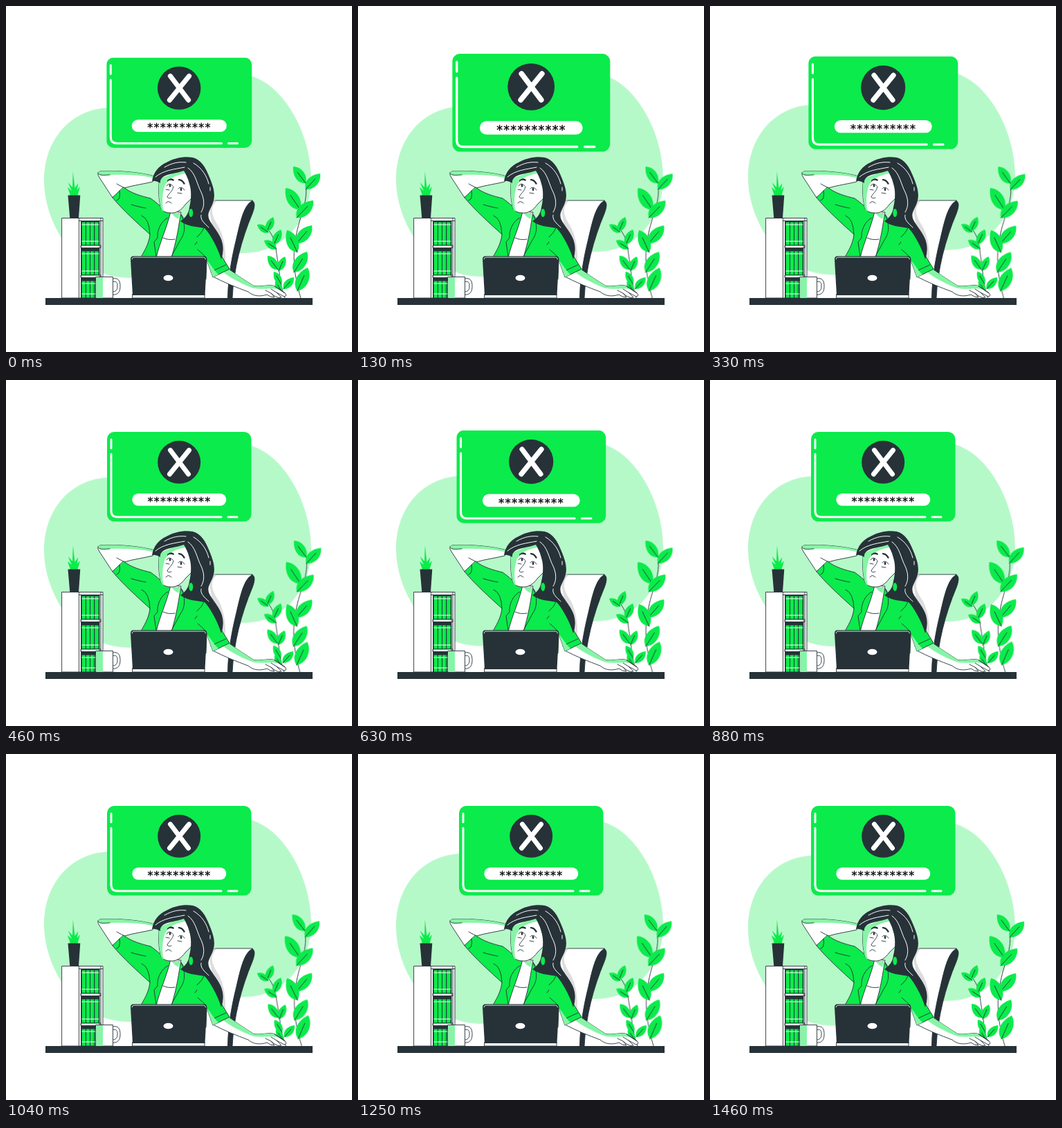
An HTML page for the animation above (1500 ms loop, 500x500 px).

```html
<!DOCTYPE html>
<html lang="en">
<head>
<meta charset="utf-8">
<title>Wrong password</title>
<style>
  html, body { margin: 0; width: 100%; height: 100%; overflow: hidden; background: #fff; }
  svg { display: block; width: 100%; height: 100%; }
  .g { fill: #0beb4b; }
  .d { fill: #263238; }
  .w { fill: #fff; }
  .m { fill: #85f5a5; }
  .ln { fill: none; }
  .o { stroke: #263238; stroke-width: .9; stroke-linecap: round; stroke-linejoin: round; }
  .hl { fill: none; stroke: #fff; stroke-linecap: round; stroke-linejoin: round; }
  #blob, #card, #plants { animation: 1.5s linear -10ms infinite; }
  #blob { animation-name: float; }
  #card { animation-name: beat; transform-origin: 250.2px 139.6px; }
  #plants { animation-name: wind; transform-origin: 408px 327px; }
  @keyframes float { 50% { transform: translateY(-10px); } }
  @keyframes beat {
    0%, 30%, 39.2%, 59.2%, 100% { transform: scale(1); }
    10%, 49.2% { transform: scale(1.1); }
  }
  @keyframes wind {
    0%, 100% { transform: rotate(0deg); }
    25% { transform: rotate(1deg); }
    75% { transform: rotate(-1deg); }
  }
</style>
</head>
<body>
<svg viewBox="0 0 500 500">
  <path id="blob" fill="#b6f9c9" d="M55 253C55 192 95 148 150 147C225 146 262 97 335 98C395 99 441 180 441 250C441 312 398 357 345 357C290 357 240 393 178 393C100 393 55 312 55 253Z"/>

  <g id="card">
    <rect class="g" x="146" y="75" width="208.5" height="129.5" rx="10.5"/>
    <path class="hl" stroke-width="3" d="M152 86V98.500M152 107V189Q152 198 161 198H311M321 198H334"/>
    <circle class="d" cx="250.200" cy="118.800" r="31"/>
    <path class="hl" stroke-width="7" d="M237.500 101.500L263.500 136M264.500 101.500L236.500 136"/>
    <rect class="w" x="182.300" y="164" width="136" height="17.800" rx="8.900"/>
    <text x="204.500" y="181.200" font-family="DejaVu Sans, sans-serif" font-size="16" letter-spacing="1.2" stroke="#111" stroke-width=".35">**********</text>
  </g>

  <g id="chair">
    <path class="w o" d="M290 284Q296 281 304 281H356C348 290 340 308 333 340Q326 372 322 400L300 380Z"/>
    <path fill="#dedcdc" d="M292 284Q300 280 304 282C292 295 300 307 308 320Q318 340 317 372L306 362Z"/>
    <path class="d o" d="M356 281.500C361 284 359 292 356 300C340 338 329 380 327 422H320.500C321 390 327 360 333 336C339 310 344 287 356 281.500Z"/>
  </g>

  <g id="plants">
    <path class="ln o" d="M426 422C416 389 413 358 420 328C426 299 437 283 433 254M403 422C395 399 396 388 393 370C389 350 391 338 378 322"/>
  </g>

  <g id="shelf">
    <path class="w o" d="M81 306.500H140V422H81Z"/>
    <path class="d" d="M108.500 311H135V422H108.500Z"/>
    <g id="books"></g>
    <path class="w o" d="M108.500 346H137V349.500H108.500ZM108.500 389H137V392.500H108.500Z"/>
    <path class="ln o" d="M105.500 306.500V422M108.500 311V422M135 311V422M137 306.500V422M105.500 310.500H140"/>
  </g>

  <g id="pot">
    <path class="g" d="M93 274L89 262L95 267L89.500 255L96 262L96.800 239L99.500 263L104.500 256L102.500 266L107 261L103.500 274Z"/>
    <path class="d" d="M89.500 273.500H107.300L105 306.500H92.300Z"/>
  </g>

  <g id="mug">
    <path class="w o" d="M154 394C163 392 165 398 165 405C165 413 162 418 153 417V413C159 413 161 410 161 405C161 400 160 397 154 398.500Z"/>
    <path class="w o" d="M130 391.500H154.500V422H130Z"/>
    <path class="m" d="M130.300 392H140V422H130.300Z"/>
  </g>

  <g id="woman">
    <path class="w o" d="M133 241Q135 238 142 238.500C166 238 192 240 215 246L212 254C200 257 184 259 171 263L154 277L135 248Q132 244 133 241Z"/>
    <path class="m" d="M133 241Q135 238 142 238.500C166 238 192 240 215 246L211 248C188 243 160 243 137 245Z"/>
    <path class="ln o" d="M133 242C136 246 145 244 150 244M160 257L171 263"/>

    <path class="w o" d="M299 391L321 380C334 389 346 397 358 404.500C370 406 381 402 388 404.500L403 414.500Q407 419 402 420L391 414L398 421Q394 423 388 419L383 415L388 421Q382 421 377 417C368 420 358 420 350 413C334 407 316 400 299 391Z"/>
    <path class="m" d="M313 384L321 380C334 389 346 397 358 404.500C370 406 381 402 388 404.500L394 409C382 407 372 410 358 408C342 402 326 394 313 384Z"/>
    <path class="ln o" d="M383 409L391 414M375 411L383 415M388 405L403 415"/>

    <path class="g o" d="M170 262C181 271 197 275 209 278C218 284 225 292 237 299L253 301C260 314 274 317 290 321C300 334 307 353 313 364L323 380L299 392L290 367L289 395H196V361C202 351 207 341 208 330C190 314 168 294 154 277Z"/>
    <path class="w o" d="M238 297L253 298C250 312 249 330 239 364H217C222 342 232 322 238 297Z"/>
    <path class="m" d="M239 299H252L249 308Q242 304 239 299Z"/>
    <path class="ln o" d="M227 335Q235 339 244 337M253 302C260 314 259 329 252 338L239 362M234 306C224 311 218 324 219 335L214 341L217 362M196 303Q207 307 208 330M181 287Q194 291 202 292M164 267Q166 280 160 281M276 334Q283 328 286 321M273 345L276 341M277 352C282 357 288 360 290 367M296 384L318 374"/>
    <path class="m" d="M290 367L299 392L307 388C300 382 296 373 290 367Z"/>

    <path class="w o" d="M222 247C219 264 221 282 224 293Q229 299 237 299C247 300 254 294 259 287L270 276L266 240L242 232Z"/>
    <path class="m" d="M221 250L257 236L259 242C242 245 231 251 228 265C225 278 226 290 228 297Q224 295 223 289C221 278 220 264 221 250Z"/>

    <path class="d" d="M211 253C213 240 221 231 232 226C244 219 259 217 270 219C282 222 288 233 293 245C298 257 303 269 300 281C298 291 290 298 293 307C297 317 311 330 313 344Q315 356 311 366C306 349 296 331 287 321C274 319 261 318 252 311C260 306 264 299 265 291C268 278 268 266 265 257C263 249 260 243 257 238C246 242 235 242 227 247Q222 251 223 256Q216 252 211 253Z"/>
    <path class="hl" stroke-width="1" d="M216 247C228 237 243 236 258 233M229 233C241 226 251 225 260 226M263 234C274 241 276 258 282 269C287 280 287 290 282 298M271 227C283 234 290 245 293 257M295 262V267M282 302C280 309 288 315 293 320"/>
    <path class="d" d="M233 252Q238 247 243 251L242 253Q237 250 233 254ZM249 250Q255 249 259 257L257 258Q254 252 249 252Z"/>
    <ellipse class="d" cx="237" cy="259.500" rx="1.300" ry="2.300"/>
    <ellipse class="d" cx="253" cy="265" rx="1.300" ry="2.300"/>
    <path class="ln o" d="M232 260Q236 254 241 260M249 264Q253 259 258 266M231 265L236 266M248 270L254 271M242 261C241 268 234 272 233 276Q235 279 239 277"/>
    <path class="ln o" stroke-width="1.200" d="M231 285Q234 280 239 285"/>
    <path class="ln o" d="M266 290V294"/>
    <ellipse class="g" cx="267.300" cy="299" rx="3" ry="6"/>
  </g>

  <g id="laptop">
    <path class="w o" d="M183 416.500H287V422H183Z"/>
    <path class="d" d="M184 361.500H286.500Q290.500 361.500 290.300 366L287.500 418H183L180 366Q180 361.500 184 361.500Z"/>
    <path class="hl" stroke-width=".8" d="M182 366Q182 363.200 185 363.200H285.500Q288.600 363.200 288.400 366"/>
    <ellipse class="w" cx="234.500" cy="393" rx="7" ry="4.300"/>
  </g>

  <rect class="d" x="57" y="422" width="386" height="10"/>
</svg>
<script>
  const $ = id => document.getElementById(id);
  function add(parent, tag, attrs) {
    const el = document.createElementNS("http://www.w3.org/2000/svg", tag);
    for (const k in attrs) el.setAttribute(k, attrs[k]);
    return parent.appendChild(el);
  }

  // Each leaf: base x, y, tip x, y
  const leaves = [
    [433, 256, 415, 232], [433, 265, 454, 242],
    [425, 294, 404, 263], [420, 306, 444, 281],
    [420, 343, 442, 317], [421, 356, 406, 324],
    [416, 385, 435, 355], [421, 412, 436, 378],
    [377, 326, 386, 305], [379, 327, 363, 316],
    [387, 345, 397, 323], [391, 351, 373, 339],
    [394, 383, 403, 362], [393, 381, 378, 361],
    [401, 409, 416, 392], [398, 402, 387, 384],
    [399, 413, 389, 398]
  ];
  for (const [x, y, tx, ty] of leaves) {
    const len = Math.hypot(tx - x, ty - y);
    const angle = Math.atan2(ty - y, tx - x) * 180 / Math.PI;
    const leaf = add($("plants"), "g", { transform: `translate(${x} ${y}) rotate(${angle}) scale(${len})` });
    add(leaf, "path", { class: "g", d: "M0 0C.2 -.33 .65 -.31 1 0C.75 .31 .25 .33 0 0Z" });
    add(leaf, "path", { class: "ln o", "vector-effect": "non-scaling-stroke", d: "M0 0H.66" });
  }

  for (const [top, bottom] of [[312, 346], [354, 389], [397, 422]]) {
    for (let i = 0; i < 4; i++) {
      add($("books"), "rect", { class: "g o", x: 109.5 + i * 6.2, y: top, width: 6, height: bottom - top });
    }
    for (const y of [top + 4, bottom - 6]) {
      add($("books"), "path", { class: "hl", "stroke-width": 1, d: `M110 ${y}H134` });
    }
  }
</script>
</body>
</html>
```
